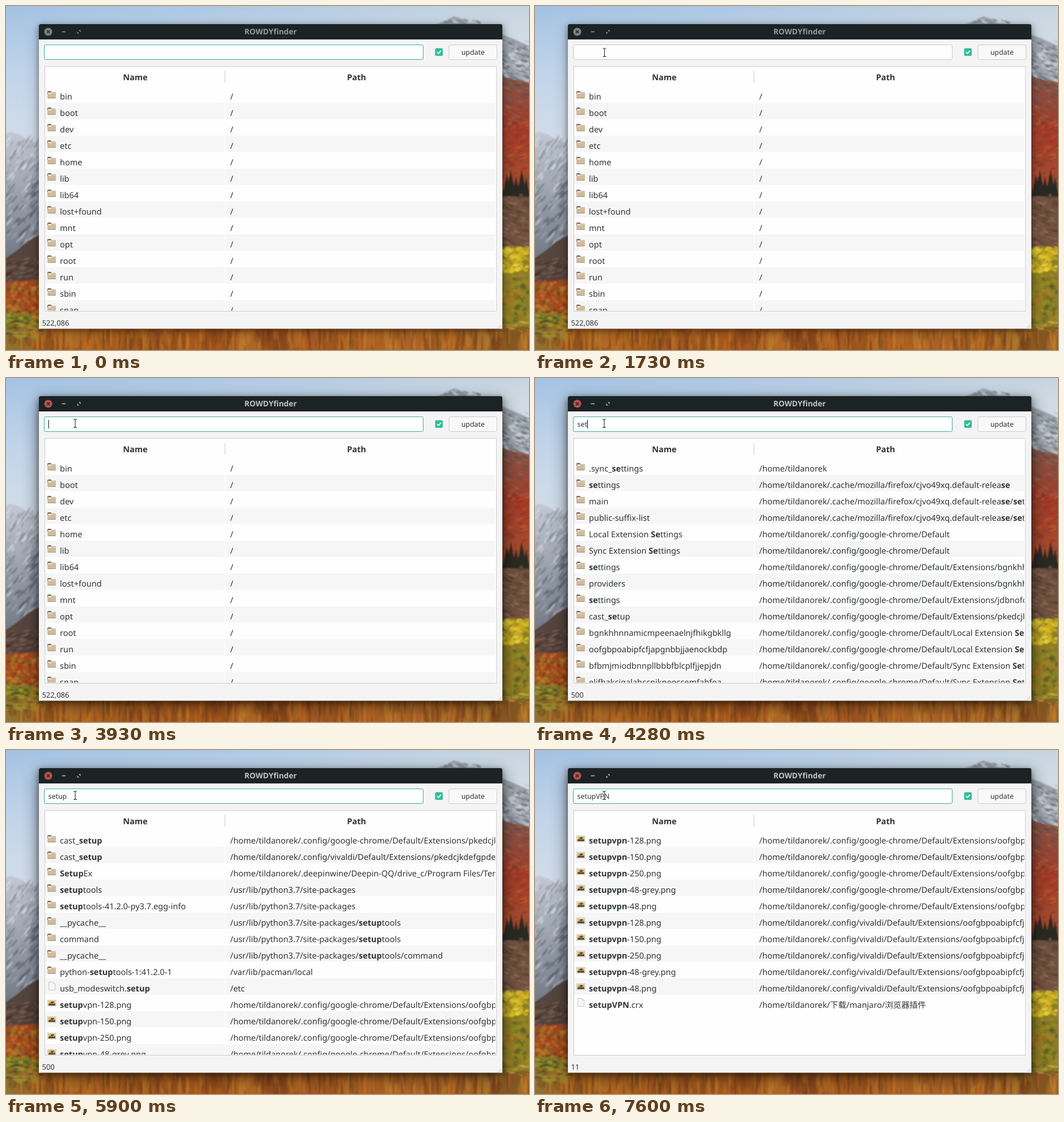
An HTML page for the animation above (8 s loop, 922 px wide and 607 px high).

```html
<!DOCTYPE html>
<html lang="en">
<head>
<meta charset="utf-8">
<title>File search</title>
<style>
  html, body { margin: 0; width: 100%; height: 100%; overflow: hidden; background: #aac4de; }
  svg { display: block; width: 100vw; height: 100vh; }
  text { font: 14.5px "Noto Sans", "Noto Sans CJK SC", "Noto Sans CJK", "Open Sans", sans-serif;
         fill: #2e3436; white-space: pre; text-rendering: geometricPrecision; }
  .b { font-weight: 700; }
  .small { font-size: 12.4px; }
</style>
</head>
<body>
<svg viewBox="0 0 922 607" preserveAspectRatio="none">
  <defs>
    <linearGradient id="sky" x2="1" y2=".25">
      <stop offset="0" stop-color="#a3c1e2"/><stop offset=".5" stop-color="#b3cbe3"/><stop offset="1" stop-color="#cbd6df"/>
    </linearGradient>
    <linearGradient id="haze" x2="0" y2="1">
      <stop offset="0" stop-color="#fff" stop-opacity="0"/><stop offset="1" stop-color="#dde1e8" stop-opacity=".8"/>
    </linearGradient>
    <linearGradient id="rock" x2="0" y2="1">
      <stop offset="0" stop-color="#c3c9d3"/><stop offset=".4" stop-color="#9aa2ae"/><stop offset="1" stop-color="#5f6672"/>
    </linearGradient>
    <linearGradient id="slope" x2="0" y2="1">
      <stop offset="0" stop-color="#80594c"/><stop offset=".4" stop-color="#a03c2b"/><stop offset="1" stop-color="#a5502f"/>
    </linearGradient>
    <linearGradient id="water">
      <stop offset="0" stop-color="#8b7430"/><stop offset=".1" stop-color="#a9601f"/><stop offset=".5" stop-color="#a9571e"/>
      <stop offset=".85" stop-color="#b06a29"/><stop offset="1" stop-color="#75501f"/>
    </linearGradient>
    <filter id="soft"><feGaussianBlur stdDeviation=".8"/></filter>
    <filter id="blurS" x="-20%" y="-20%" width="140%" height="140%"><feGaussianBlur stdDeviation="6"/></filter>
    <filter id="blurL" x="-20%" y="-20%" width="140%" height="140%"><feGaussianBlur stdDeviation="15"/></filter>
    <clipPath id="nameCol"><rect x="69" y="141" width="316" height="396.5"/></clipPath>
    <clipPath id="pathCol"><rect x="387" y="141" width="475.5" height="396.5"/></clipPath>
    <clipPath id="list"><rect x="69" y="141" width="793.5" height="396.5"/></clipPath>
    <g id="folder">
      <path d="M0 1.500q0-1.500 1.500-1.500H6l1.500 2H14.500V6H0z" fill="#806d57"/>
      <rect x="1" y="2.500" width="13.500" height="4" fill="#f1ece3"/>
      <path d="M0 5H6l1.500-1.500H15V11.500q0 1-1 1H1q-1 0-1-1z" fill="#d0bb9b"/>
      <path d="M.5 12.500H14.500" stroke="#a18c70"/>
    </g>
    <g id="image">
      <rect x=".5" y="1.500" width="14.500" height="10.500" fill="#f4f2ee" stroke="#b9b6b0" stroke-width=".8"/>
      <rect x="1.800" y="2.800" width="12" height="8" fill="#e0b55c"/>
      <path d="M1.800 10.800V8.500L5 7 8 8.500 13.800 7.200V10.800z" fill="#54422c"/>
      <path d="M6 7q-1-3 2-3.500 4-.5 3.500 2.500l-2 .5V9H8V7z" fill="#5e4f30"/>
    </g>
    <g id="file">
      <path d="M2.500-1.500H10L13.500 2V12.500H2.500z" fill="#f6f6f6" stroke="#c2c2c2" stroke-width=".9"/>
      <path d="M10-1.500V2H13.500z" fill="#d2d2d2"/>
    </g>
  </defs>

  <rect width="922" height="607" fill="url(#sky)"/>
  <rect width="922" height="260" fill="url(#haze)"/>
  <g id="scene" filter="url(#soft)"></g>

  <rect id="shadeS" x="58" y="35" width="817" height="537" filter="url(#blurS)"/>
  <rect id="shadeL" x="56" y="42" width="821" height="539" filter="url(#blurL)"/>

  <path d="M58 569.500V35q0-3 3-3H872q3 0 3 3V569.500z" fill="#f5f4f4"/>
  <path d="M58 59V35q0-3 3-3H872q3 0 3 3V59z" fill="#1b2324"/>
  <path d="M874 560V568.500H865z" fill="#e6e5e5"/>
  <text id="title" x="466.500" y="50" text-anchor="middle" style="font-size:13.6px;font-weight:600">ROWDYfinder</text>
  <circle id="close" cx="74.500" cy="45.500" r="7"/>
  <path d="M72 43l5 5m0-5l-5 5" stroke="#1b2324" stroke-width="1.500"/>
  <path id="mini" d="M98.500 45.500H105" stroke-width="1.500"/>
  <circle id="hover" cx="128.500" cy="45.500" r="7.800" fill="#56676b"/>
  <path id="maxi" d="M128 42.500H131.500V46zM125.500 45V48.500H129z"/>

  <rect id="entry" x="67.500" y="68.500" width="668" height="26" rx="2.500" fill="#fefefe"/>
  <text id="typed" class="small" x="74.500" y="86"></text>
  <rect id="caret" y="74" width="1.200" height="15" fill="#222"/>
  <rect x="756.500" y="74.500" width="13.500" height="13.500" rx="2" fill="#36bd96"/>
  <path d="M760 81.300l2.500 2.500 4.300-5" fill="none" stroke="#fff" stroke-width="1.800"/>
  <rect x="781" y="68.500" width="84.500" height="26" rx="2.500" fill="#f9f9f9" stroke="#cbcac9"/>
  <text class="small" x="823.300" y="86" text-anchor="middle">update</text>

  <rect x="68.500" y="106.500" width="796" height="432" fill="#fefefe" stroke="#cfcecd"/>
  <text class="b" x="228" y="131" text-anchor="middle">Name</text>
  <text class="b" x="618" y="131" text-anchor="middle">Path</text>
  <path d="M386 115V135.500" stroke="#c8c8c8"/>
  <g clip-path="url(#list)"><g id="bands"></g></g>
  <g clip-path="url(#nameCol)"><g id="names"></g></g>
  <g clip-path="url(#pathCol)"><g id="paths"></g></g>
  <text id="count" x="63.400" y="564" style="font-size:13px"></text>

  <path id="arrow" d="M0 0V16.500L3.700 13.200 6.200 18.800 8.800 17.600 6.400 12.200H11z" fill="#38393b" stroke="#f4f4f4" stroke-width="1"/>
  <g id="beam" fill="none">
    <path d="M-3-7.500Q0-7.500 0-5.500Q0-7.500 3-7.500M0-6V6M-3 7.500Q0 7.500 0 5.500Q0 7.500 3 7.500" stroke="#fff" stroke-width="2.600"/>
    <path d="M-3-7.500Q0-7.500 0-5.500Q0-7.500 3-7.500M0-6V6M-3 7.500Q0 7.500 0 5.500Q0 7.500 3 7.500" stroke="#2b2b2b" stroke-width="1.100"/>
  </g>
</svg>
<script>
const LOOP = 8000, PITCH = 29;
const $ = id => document.getElementById(id);
const set = (id, attrs) => { for (const k in attrs) $(id).setAttribute(k, attrs[k]); };
const show = (id, on) => set(id, { visibility: on ? 'visible' : 'hidden' });
const ramp = (t, a, b) => Math.min(1, Math.max(0, (t - a) / (b - a)));
const mix = (a, b, k) => `rgb(${a.map((v, i) => Math.round(v + (b[i] - v) * k))})`;
const latest = (list, t) => list.filter(e => e[0] <= t).pop();

// Landscape behind the window
let seed = 7;
const rnd = () => {
  seed = (seed * 16807) % 2147483647;
  return seed / 2147483647;
};
const poly = (points, fill) => `<polygon points="${points}" fill="${fill}"/>`;
function scatter(n, [x0, y0, x1, y1], colors, rx, ry, tilt = 0, alpha = .6) {
  let out = '';
  for (let i = 0; i < n; i++) {
    const x = (x0 + rnd() * (x1 - x0)).toFixed(1), y = (y0 + rnd() * (y1 - y0)).toFixed(1);
    const s = .5 + rnd(), c = colors[Math.floor(rnd() * colors.length)];
    out += `<ellipse cx="${x}" cy="${y}" rx="${(rx * s).toFixed(1)}" ry="${(ry * s).toFixed(1)}" ` +
      `fill="${c}" opacity="${alpha}" transform="rotate(${tilt} ${x} ${y})"/>`;
  }
  return out;
}
const pine = (x, y, h) => poly(`${x},${y} ${x + h / 5},${y + h} ${x - h / 5},${y + h}`, '#2c2a22');

$('scene').innerHTML =
  poly('-8,226 8,222 22,226 34,234 48,238 70,256 70,500 -8,500', 'url(#rock)') +
  scatter(90, [0, 235, 60, 330], ['#e1e5ea', '#cdd3db', '#868e9b', '#747c89'], 1.6, 7, 35, .5) +
  scatter(90, [0, 315, 60, 420], ['#c6ccd4', '#a0a7b2', '#4d5460', '#5c636f'], 1.6, 7, 40, .5) +
  poly('-8,450 18,432 40,414 70,398 70,500 -8,500', '#56443c') +
  scatter(80, [0, 445, 60, 488], ['#3d302c', '#74594b', '#84675a', '#4a3a35'], 5, 1.4, -18) +
  poly('-8,488 70,482 70,560 -8,560', '#9d4b20') +
  scatter(150, [0, 488, 60, 545], ['#cf5a20', '#b53f20', '#d67c2a', '#6b3a1e', '#8f7d2b'], 3, 2.5) +
  poly('-8,540 70,546 70,575 -8,575', '#7f7f29') +
  scatter(80, [0, 545, 60, 568], ['#b3a62d', '#566a29', '#c98b2c', '#434b22'], 4, 1.4) +

  poly('745,40 765,30 778,24 790,18 802,22 815,29 835,32 862,46 890,56 930,74 930,150 745,150', '#9da5af') +
  scatter(50, [775, 24, 835, 34], ['#848c96', '#d7dce1', '#6d757f'], 3.5, 1, 20) +
  scatter(120, [874, 62, 922, 132], ['#dde1e5', '#747b84', '#5a616b', '#c6cbd1'], 4, 1.4, 28) +
  poly('870,122 895,130 930,136 930,340 870,340', 'url(#slope)') +
  scatter(60, [875, 132, 922, 205], ['#9a6a54', '#6d4a40', '#a54a34', '#7c5b4e'], 5, 1.6, 20) +
  scatter(110, [875, 205, 922, 318], ['#b9432a', '#8c3024', '#c25c2d', '#754632', '#ad3626'], 5, 1.8, -18) +
  poly('870,320 900,330 930,335 930,432 870,432', '#71513f') +
  scatter(100, [875, 330, 922, 425], ['#8e6b53', '#50392f', '#9a765e', '#5f4437'], 5, 1.3, 22) +
  pine(883, 296, 40) + pine(890, 289, 46) + pine(899, 300, 36) + pine(909, 288, 44) + pine(917, 302, 34) +
  poly('870,428 890,423 930,430 930,570 870,570', '#8b7f22') +
  scatter(110, [875, 427, 922, 470], ['#ebd02a', '#dab924', '#c2a222', '#eed63f'], 4, 2.6) +
  scatter(150, [875, 474, 922, 556], ['#77782a', '#9c9028', '#565a22', '#b0772a', '#85802c'], 3.5, 3) +
  '<rect x="-8" y="567" width="940" height="50" fill="url(#water)"/>' +
  scatter(70, [0, 575, 922, 605], ['#d07c27', '#6a391b', '#c98d35', '#84451c'], 9, 20, 0, .3) +
  scatter(230, [0, 572, 922, 606], ['#d47d28', '#693719', '#c98b32', '#854119', '#d99237', '#5a3b1d'], 1.5, 14, 0, .4) +
  scatter(60, [0, 568, 62, 588], ['#8a963a', '#4a5128', '#b98c2e'], 5, 1.2) +
  scatter(50, [868, 556, 922, 574], ['#d3b052', '#6b5423', '#99812d'], 5, 1.3);

// Search results: [icon, name, path]
const HOME = '/home/tildanorek';
const FOX = HOME + '/.cache/mozilla/firefox/cjvo49xq.default-release';
const CHROME = HOME + '/.config/google-chrome/Default';
const VIVALDI = HOME + '/.config/vivaldi/Default';
const SITE = '/usr/lib/python3.7/site-packages';
const BGN = 'bgnkhhnnamicmpeenaelnjfhikgbkllg';
const OOF = 'oofgbpoabipfcfjapgnbbjjaenockbdp';
const CAST = '/Extensions/pkedcjkdefgpdelpbcmbmeomcjbeemfm';
const dir = (name, path) => ['folder', name, path];
const pngs = base => ['128', '150', '250', '48-grey', '48']
  .map(s => ['image', `setupvpn-${s}.png`, `${base}/Extensions/${OOF}`]);

const roots = 'bin boot dev etc home lib lib64 lost+found mnt opt root run sbin snap'.split(' ').map(n => dir(n, '/'));
const settings = [
  dir('.sync_settings', HOME),
  dir('settings', FOX),
  dir('main', FOX + '/settings'),
  dir('public-suffix-list', FOX + '/settings'),
  dir('Local Extension Settings', CHROME),
  dir('Sync Extension Settings', CHROME),
  dir('settings', `${CHROME}/Extensions/${BGN}`),
  dir('providers', `${CHROME}/Extensions/${BGN}`),
  dir('settings', CHROME + '/Extensions/jdbnofccmhefkmjbkkdkfi'),
  dir('cast_setup', CHROME + CAST),
  dir(BGN, CHROME + '/Local Extension Settings'),
  dir(OOF, CHROME + '/Local Extension Settings'),
  dir('bfbmjmiodbnnpllbbbfblcplfjjepjdn', CHROME + '/Sync Extension Settings'),
  dir('elifhakcjgalahccnjkneoccemfahfoa', CHROME + '/Sync Extension Settings')
];
const setups = [
  dir('cast_setup', CHROME + CAST),
  dir('cast_setup', VIVALDI + CAST),
  dir('SetupEx', HOME + '/.deepinwine/Deepin-QQ/drive_c/Program Files/Tencent'),
  dir('setuptools', SITE),
  dir('setuptools-41.2.0-py3.7.egg-info', SITE),
  dir('__pycache__', SITE + '/setuptools'),
  dir('command', SITE + '/setuptools'),
  dir('__pycache__', SITE + '/setuptools/command'),
  dir('python-setuptools-1:41.2.0-1', '/var/lib/pacman/local'),
  ['file', 'usb_modeswitch.setup', '/etc'],
  ...pngs(CHROME).slice(0, 4)
];
const vpns = [...pngs(CHROME), ...pngs(VIVALDI), ['file', 'setupVPN.crx', HOME + '/下载/manjaro/浏览器插件']];

// Timelines
const typing = [[0, ''], [3950, 's'], [4150, 'se'], [4280, 'set'], [5030, 'setu'], [5250, 'setup'],
  [6450, 'setupV'], [6600, 'setupVP'], [6950, 'setupVPN']];
const results = [[0, roots, '', '522,086'], [4200, settings, 'se', '500'], [4330, settings, 'set', '500'],
  [5080, setups, 'setu', '500'], [5300, setups, 'setup', '500'], [6500, vpns, 'setupv', '11'],
  [6650, vpns, 'setupvp', '11'], [7000, vpns, 'setupvpn', '11']];
const blink = [[0, false], [2580, true], [3030, false], [3930, true], [4900, false], [5030, true],
  [5900, false], [6450, true], [7600, false]];
const pointer = [[30, 757, 4], [250, 540, 16], [450, 180, 46], [560, 125, 57], [650, 125, 57], [799, 126, 68],
  [800, 126, 69], [899, 126, 69], [900, 126, 77], [1099, 126, 77], [1100, 125, 72], [1300, 123.5, 82],
  [1729, 123.5, 82], [1730, 122.5, 82], [1830, 122, 80], [LOOP, 122, 80]];

function pointerAt(t) {
  const i = Math.max(1, pointer.findIndex(p => p[0] > t));
  const [a, b] = [pointer[i - 1], pointer[i]], k = ramp(t, a[0], b[0]);
  return [a[1] + (b[1] - a[1]) * k, a[2] + (b[2] - a[2]) * k];
}

const mark = (s, q) => q ? s.replace(new RegExp(q, 'gi'), '<tspan class="b">$&</tspan>') : s;

let shown;
function drawResults(state) {
  if (state === shown) return;
  shown = state;
  const [, rows, query, count] = state;
  let bands = '', names = '', paths = '';
  rows.forEach(([icon, name, path], i) => {
    const y = i * PITCH;
    if (i % 2) bands += `<path d="M69 ${142 + y}H385.500v28.500H69zM387 ${142 + y}H862.500v28.500H387z" fill="#f6f6f6"/>`;
    names += `<use href="#${icon}" x="73" y="${150 + y}"/><text x="95" y="${165 + y}">${mark(name, query)}</text>`;
    paths += `<text x="395.300" y="${165 + y}">${mark(path, query)}</text>`;
  });
  $('bands').innerHTML = bands;
  $('names').innerHTML = names;
  $('paths').innerHTML = paths;
  $('count').textContent = count;
}

function draw(t) {
  const active = t >= 2580, rise = ramp(t, 2600, 2780);
  const focus = active ? rise : 1 - ramp(t, 30, 230);
  const hover = t >= 500 && t < 700;
  const ink = active ? '#b9bfc0' : '#8f9698';

  set('shadeS', { opacity: .5 });
  set('shadeL', { opacity: .15 + .3 * rise });
  $('title').style.fill = active ? '#c0c5c6' : '#949b9d';
  set('close', { fill: active ? '#b9514f' : '#7d8486' });
  set('mini', { stroke: ink });
  set('maxi', { fill: hover ? '#e8eeee' : ink });
  show('hover', hover);
  set('entry', { stroke: mix([203, 201, 199], [66, 174, 148], focus) });

  $('typed').textContent = latest(typing, t)[1];
  set('caret', { x: 74.5 + $('typed').getComputedTextLength() });
  show('caret', latest(blink, t)[1]);
  drawResults(latest(results, t));

  const [x, y] = pointerAt(t), beam = t >= 800;
  show('arrow', t >= 30 && !beam);
  show('beam', beam);
  set(beam ? 'beam' : 'arrow', { transform: `translate(${x} ${y})` });
}

const start = performance.now();
function tick() {
  draw((performance.now() - start) % LOOP);
  requestAnimationFrame(tick);
}
tick();
</script>
</body>
</html>
```
